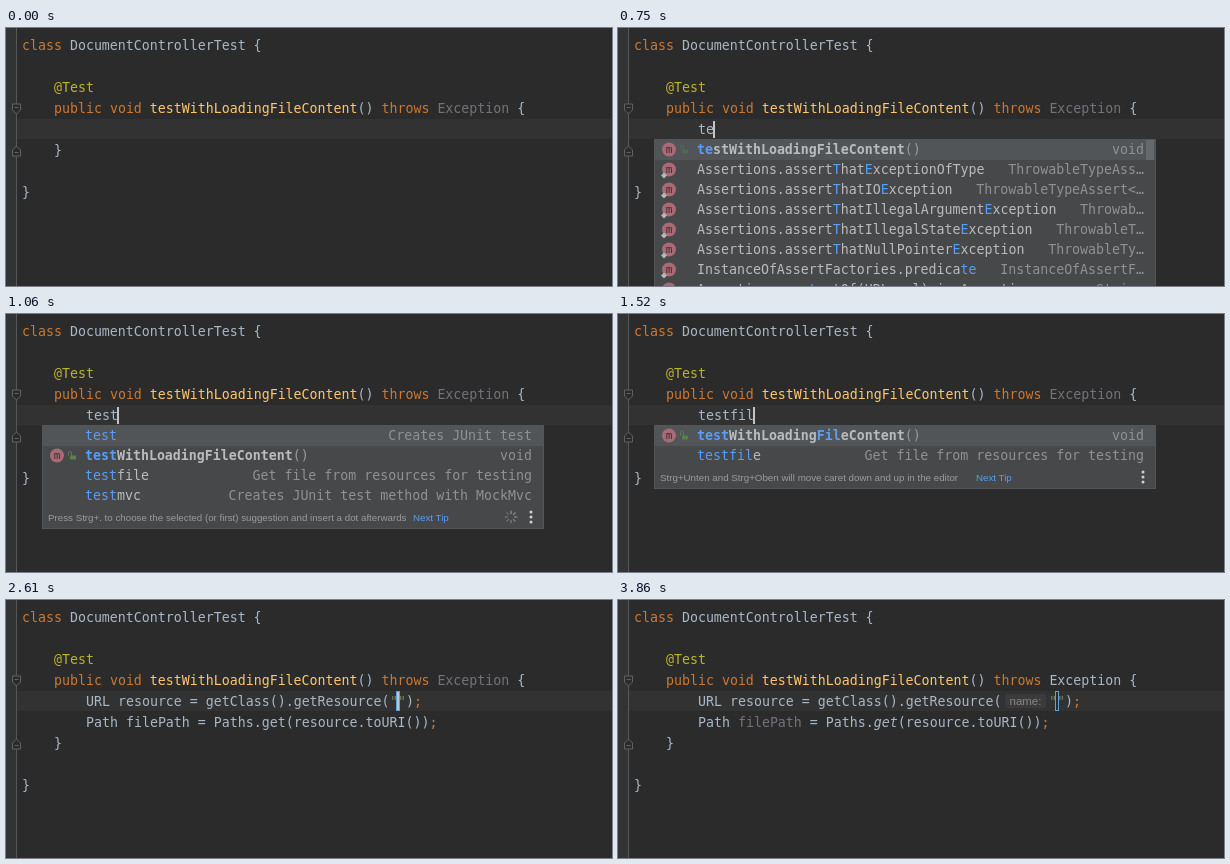
Write an HTML page that moves like this. It is 606 px wide and 258 px high and loops after 4090 ms.

```html
<!DOCTYPE html>
<html lang="en">
<head>
<meta charset="utf-8">
<title>Live template in a code editor</title>
<style>
  html, body { margin: 0; width: 100%; height: 100%; overflow: hidden; background: #2b2b2b; }
  svg { display: block; width: 606px; height: 258px; }
  text { white-space: pre; font: 13.288px "DejaVu Sans Mono", monospace; fill: #a9b7c6; }
  .popup text { fill: #bbb; }
  .popup text.tail { fill: #8f9193; text-anchor: end; }
  text.ui { font: 9.76px "Liberation Sans", Arial, sans-serif; fill: #a0a2a4; }
  .popup text.ui { fill: #999b9d; }
  .popup .match { fill: #589df6; }
  .bold { font-weight: bold; }
  .kw { fill: #cc7832; }
  .note { fill: #bbb529; }
  .method { fill: #ffc66d; }
  .dim { fill: #72737a; }
  .str { fill: #6a8759; }
  .static { font-style: italic; }
</style>
</head>
<body>
<svg id="stage" viewBox="0 0 606 258"></svg>
<script>
const LOOP = 4090, CHAR = 8, LINE = 21, ROW = 20;
const stage = document.getElementById('stage');

const esc = s => s.replace(/&/g, '&amp;').replace(/</g, '&lt;');
const rect = (x, y, w, h, fill, more = '') =>
  `<rect x="${x}" y="${y}" width="${w}" height="${h}" fill="${fill}" ${more}/>`;
const text = (x, y, body, cls = '') => `<text x="${x}" y="${y}" class="${cls}">${body}</text>`;
const span = (cls, s) => `<tspan class="${cls}">${esc(s)}</tspan>`;
const kw = s => span('kw', s);
const lineTop = n => 7 + LINE * n;
const codeLine = (n, indent, body) => text(16 + indent * CHAR, lineTop(n) + 15, body);

// Square brackets mark the matched letters.
const marked = s => esc(s).replace(/\[(.*?)\]/g, '<tspan class="match">$1</tspan>');

function fold(y, dir) {
  const p = `M6.5 ${y - 5 * dir}h8v${6 * dir}l-4 ${4 * dir}l-4 ${-4 * dir}z`;
  return `<path d="${p}M8.5 ${y - 1.5 * dir}h4" fill="#2b2b2b" stroke="#5f6163"/>`;
}

function caret(x) {
  return rect(x - 1, 93, 2, 17, '#c4c4c4');
}

function field(x, on) {
  return rect(x - 1.5, 91.5, 3, 19, on ? '#9fc6e4' : '#252b30', 'stroke="#5ba3d8"') + (on ? caret(x) : '');
}

function inlay() {
  return rect(387, 94, 41, 14, '#3b3b3b', 'rx="3"') +
    `<text x="391.5" y="105" class="ui" style="font-size:11.5px;fill:#858789">name:</text>`;
}

function methodIcon(y, kind) {
  let out = `<circle cx="51" cy="${y}" r="7" fill="#a86b75"/>` +
    `<text x="51" y="${y + 3.3}" text-anchor="middle" style="font-size:11px;fill:#3a2d30">m</text>`;
  if (kind === 'static')
    out += `<path d="M46 ${y + 3}l3 3l-3 3l-3 -3z" fill="#b5b8ba"/>`;
  else
    out += `<g opacity="${kind === 'loading' ? .4 : 1}">` + rect(64, y, 6, 4, '#59804f') +
      `<path d="M62.5 ${y}v-2.5q0 -1.5 1.5 -1.5t1.5 1.5v2.5" fill="none" stroke="#59804f"/></g>`;
  return out;
}

function spinner(y) {
  let out = '';
  for (let i = 0; i < 8; i++)
    out += `<path d="M505 ${y - 3}v-3.3" stroke="#8d9092" stroke-opacity="${1 - i * .07}" ` +
      `stroke-width="1.3" transform="rotate(${i * 45} 505 ${y})"/>`;
  return out;
}

function popupRow({ label, tail, icon, params = '' }, i) {
  const y = 112 + i * ROW, base = y + 14;
  return (icon ? methodIcon(y + 9.5, icon) : '') +
    text(79, base, span(params ? 'bold' : '', '').replace('></', '>' + marked(label) + '</') +
      (params && `<tspan fill="#989a9c">${params}</tspan>`)) +
    text(526, base, esc(tail), 'tail');
}

function popup({ rows, selected = 0, color = '#515558', tip, busy }) {
  const listH = rows.length * ROW, h = listH + (tip ? 24 : 0);
  let out = rect(36, 111, 502, h, '#46484a') + rect(36.5, 111.5, 501, h - 1, 'none', 'stroke="#535658"') +
    rect(37, selected ? 112 + selected * ROW - 1 : 112, 500, selected ? ROW + 1 : ROW, color) +
    rows.map(popupRow).join('');
  if (tip) {
    const y = 112 + listH + 11;
    out += text(42, y + 4, tip.text, 'ui') +
      `<text x="${tip.next}" y="${y + 4}" class="ui" style="fill:#589df6">Next Tip</text>` +
      [-5, 0, 5].map(d => `<circle cx="525" cy="${y + d}" r="1.5" fill="#cfd1d3"/>`).join('') +
      (busy ? spinner(y) : '');
  } else {
    out += rect(528, 112, 8, 20, '#66696b');
  }
  return `<g class="popup">${out}</g>`;
}

const method = (label, icon = 'public') => ({ label, icon, params: '()', tail: 'void' });
const assertion = (label, tail) => ({ label: 'Assertions.' + label, tail, icon: 'static' });
const fileTail = 'Get file from resources for testing';

const wideList = icon => ({ rows: [
  method('[te]stWithLoadingFileContent', icon),
  assertion('assert[T]hat[E]xceptionOfType', 'ThrowableTypeAss…'),
  assertion('assert[T]hatIO[E]xception', 'ThrowableTypeAssert<…'),
  assertion('assert[T]hatIllegalArgument[E]xception', 'Throwab…'),
  assertion('assert[T]hatIllegalState[E]xception', 'ThrowableT…'),
  assertion('assert[T]hatNullPointer[E]xception', 'ThrowableTy…'),
  { label: 'InstanceOfAssertFactories.predica[te]', tail: 'InstanceOfAssertF…', icon: 'static' },
  assertion('con[te]ntOf(URL url) in Assertions', 'String')
] });

function testList(typed) {
  const hit = word => `[${typed}]` + word.slice(typed.length);
  return {
    rows: [
      { label: hit('test'), tail: 'Creates JUnit test' },
      method(hit('testWithLoadingFileContent')),
      { label: hit('testfile'), tail: fileTail },
      { label: hit('testmvc'), tail: 'Creates JUnit test method with MockMvc' }
    ],
    tip: { text: 'Press Strg+. to choose the selected (or first) suggestion and insert a dot afterwards', next: 407 },
    busy: true
  };
}

function fileList(n, more) {
  const word = 'File';
  return {
    rows: [
      method(`[test]WithLoading[${word.slice(0, n)}]${word.slice(n)}Content`),
      { label: `[test${'file'.slice(0, n)}]${'file'.slice(n)}`, tail: fileTail }
    ],
    tip: { text: 'Strg+Unten and Strg+Oben will move caret down and up in the editor', next: 358 },
    ...more
  };
}

const picked = { selected: 1, color: '#113a5c' };

const steps = [
  [0, { typed: '' }],
  [360, { typed: '', caret: true }],
  [610, { typed: 't', caret: true }],
  [680, { typed: 'te', caret: true }],
  [750, { typed: 'te', caret: true, popup: wideList('loading') }],
  [830, { typed: 'te', caret: true, popup: wideList('public') }],
  [900, { typed: 'tes', caret: true, popup: wideList('public') }],
  [980, { typed: 'tes', caret: true, popup: testList('tes') }],
  [1060, { typed: 'test', caret: true, popup: testList('test') }],
  [1130, { typed: 'testf', caret: true, popup: fileList(1, { busy: true }) }],
  [1210, { typed: 'testfi', caret: true, popup: fileList(1, { busy: true }) }],
  [1290, { typed: 'testfi', caret: true, popup: fileList(2) }],
  [1520, { typed: 'testfil', caret: true, popup: fileList(3) }],
  [1990, { typed: 'testfil', caret: true, popup: fileList(3, picked) }],
  [2310, { typed: 'testfil', popup: fileList(3, picked) }],
  [2540, { expanded: true }],
  [2610, { expanded: true, field: true, caret: true }],
  [2930, { expanded: true, field: true, caret: true, hint: true }],
  [3250, { expanded: true, field: true, caret: true, hint: true, checked: true }],
  [3860, { expanded: true, field: true, hint: true, checked: true }]
];

function template(s) {
  const shift = s.hint ? 47 : 0;
  return codeLine(4, 8, 'URL resource = getClass().getResource(') +
    (s.hint ? inlay() : '') +
    text(384 + shift, 106, span('str', '""') + ')' + kw(';')) +
    codeLine(5, 8, 'Path ' + span(s.checked ? 'dim' : '', 'filePath') + ' = Paths.' +
      span(s.hint ? 'static' : '', 'get') + '(resource.toURI())' + kw(';')) +
    (s.field ? field(392 + shift, s.caret) : '');
}

function draw(s) {
  const end = s.expanded ? 6 : 5;
  stage.innerHTML =
    rect(0, 0, 606, 258, '#2b2b2b') + rect(0, 0, 10, 258, '#313335') +
    rect(11, 91, 595, 20, '#323232') + rect(10, 0, 1, 258, '#555759') +
    fold(81, 1) + fold(lineTop(end) + 11, -1) +
    codeLine(0, 0, kw('class ') + 'DocumentControllerTest {') +
    codeLine(2, 4, span('note', '@Test')) +
    codeLine(3, 4, kw('public void ') + span('method', 'testWithLoadingFileContent') + '() ' +
      kw('throws ') + span(s.checked ? '' : 'dim', 'Exception') + ' {') +
    codeLine(end, 4, '}') + codeLine(end + 2, 0, '}') +
    (s.expanded ? template(s) : codeLine(4, 8, s.typed) +
      (s.caret ? caret(80 + s.typed.length * CHAR) : '')) +
    (s.popup ? popup(s.popup) : '');
}

const start = performance.now();
let shown = -1;

function tick() {
  const t = (performance.now() - start) % LOOP;
  const at = steps.filter(([from]) => from <= t).length - 1;
  if (at !== shown) draw(steps[shown = at][1]);
  requestAnimationFrame(tick);
}
tick();
</script>
</body>
</html>
```
